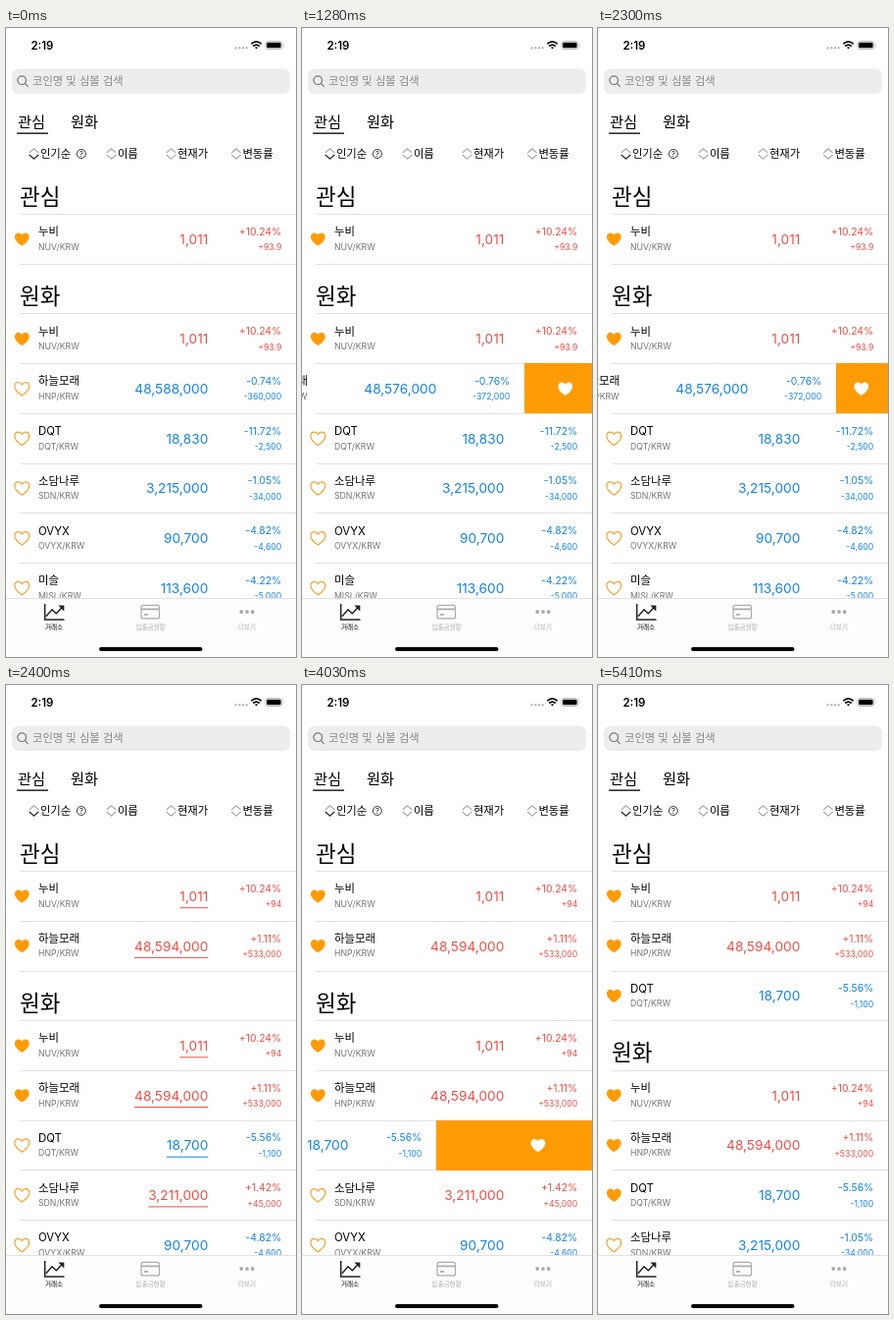
Recreate the animation shown at these times as an HTML page. Size 296 by 640 pixels, loop 5.7 s.

```html
<!DOCTYPE html>
<html lang="ko">
<head>
<meta charset="utf-8">
<title>거래소</title>
<style>
  html, body { margin: 0; width: 100%; height: 100%; overflow: hidden; background: #fff; }
  svg { display: block; width: 100vw; height: 100vh; }
  text { font-family: Inter, 'Noto Sans CJK KR', 'Noto Sans CJK', sans-serif; font-size: 11.4px; fill: #000; }
  .line { stroke: #e2e2e2; stroke-width: 1; }
  .title { font-size: 22.5px; }
  .tab { font-size: 15.3px; }
  .hint { font-size: 11.3px; fill: #8a8a8e; }
  .pair { font-size: 8.7px; fill: #747474; }
  .price { font-size: 13.7px; }
  .rate { font-size: 10.4px; }
  .diff { font-size: 8.7px; }
  .price, .rate, .diff { text-anchor: end; }
  .up { fill: #ee4f47; stroke: #ee4f47; }
  .down { fill: #1583e9; stroke: #1583e9; }
  text.up, text.down { stroke: none; }
  .on { fill: #ff9b05; }
  .off { fill: none; stroke: #f5a32c; stroke-width: 1.2; }
  .menu { font-size: 6.6px; fill: #a8a8a8; text-anchor: middle; }
  .ink { fill: none; stroke: #222; stroke-width: 1.2; }
  .dim { fill: none; stroke: #ababab; stroke-width: 1.2; }
</style>
</head>
<body>
<svg viewBox="0 0 296 640">
  <defs>
    <path id="heart" d="M0 6.8C-3.2 4.7-7.4 1.6-7.4-2.4C-7.4-4.9-5.7-6.6-3.6-6.6C-2-6.6-.7-5.7 0-4.3C.7-5.7 2-6.6 3.6-6.6C5.7-6.6 7.4-4.9 7.4-2.4C7.4 1.6 3.2 4.7 0 6.8Z"/>
    <path id="asc" d="M-4.8-1L0-5.3L4.8-1"/>
    <path id="desc" d="M-4.8 1L0 5.3L4.8 1"/>
  </defs>

  <g id="list"></g>

  <!-- status bar -->
  <text x="25.5" y="22" style="font-weight:600">2:19</text>
  <g fill="#bdbdbd">
    <circle cx="234.5" cy="20.3" r="1.2"/><circle cx="238.2" cy="20.3" r="1.2"/>
    <circle cx="241.9" cy="20.3" r="1.2"/><circle cx="245.6" cy="20.3" r="1.2"/>
  </g>
  <g fill="none" stroke="#000" stroke-width="1.7">
    <path d="M250.3 16.2Q255.5 11.5 260.7 16.2M252.2 18.5Q255.5 15.6 258.8 18.5"/>
    <path d="M254 19.8Q255.5 18.7 257 19.8L255.5 21.4Z" fill="#000" stroke="none"/>
  </g>
  <rect x="264.8" y="13.5" width="17" height="8" rx="2.4" fill="none" stroke="#aaa" stroke-width=".8"/>
  <rect x="266" y="14.7" width="14.6" height="5.6" rx="1.3"/>
  <path d="M283 16.2Q284.4 17.5 283 18.8Z" fill="#aaa"/>

  <!-- search -->
  <rect x="6" y="41.5" width="284" height="25.5" rx="7" fill="#ededee"/>
  <g class="ink" style="stroke:#77777b"><circle cx="16.2" cy="53.2" r="4.3"/><path d="M19.3 56.4L22.6 59.8"/></g>
  <text class="hint" x="27" y="58.2">코인명 및 심볼 검색</text>

  <!-- tabs -->
  <text class="tab" x="12" y="100.8">관심</text>
  <text class="tab" x="66" y="100.8">원화</text>
  <rect x="11" y="106.5" width="32" height="1.3"/>

  <g id="sort"></g>
  <g class="ink" style="stroke-width:.9"><circle cx="76.8" cy="128" r="4.5"/></g>
  <text x="76.8" y="130.7" style="font-size:7.4px;text-anchor:middle">?</text>

  <!-- bottom bar -->
  <rect y="581" width="296" height="59" fill="#fefefe"/>
  <path class="line" d="M0 580.5H296"/>
  <path class="ink" style="stroke-width:1.5" d="M39.7 586V602H59.5M41 598.5L47 591.8L51.3 595.8L57 589.8"/>
  <path d="M53.4 587.6H59.3V593.5Z" fill="#222"/>
  <g class="dim"><rect x="138" y="587.3" width="18.5" height="13.6" rx="2"/><path d="M138 591.3H156.5M141 596.8H145" stroke-width="1.8"/></g>
  <g fill="#ababab"><circle cx="240.3" cy="594" r="1.9"/><circle cx="246" cy="594" r="1.9"/><circle cx="251.7" cy="594" r="1.9"/></g>
  <text class="menu" x="49" y="612.3" style="fill:#000;font-weight:500">거래소</text>
  <text class="menu" x="147.5" y="612.3">입출금현황</text>
  <text class="menu" x="246" y="612.3">더보기</text>
  <rect x="95" y="630" width="105.5" height="4" rx="2"/>
</svg>

<script>
const LOOP = 5700, ROW = 50.7, REST = 55, PRICE_END = 206.3;

// quotes: start time, price, rate, difference
const coins = [
  { name: '누비', code: 'NUV', quotes: [[0, '1,011', '+10.24%', '+93.9'], [2400, '1,011', '+10.24%', '+94']] },
  { name: '하늘모래', code: 'HNP', quotes: [[0, '48,588,000', '-0.74%', '-360,000'],
    [730, '48,576,000', '-0.76%', '-372,000'], [2400, '48,594,000', '+1.11%', '+533,000']] },
  { name: 'DQT', code: 'DQT', quotes: [[0, '18,830', '-11.72%', '-2,500'], [2400, '18,700', '-5.56%', '-1,100']] },
  { name: '소담나루', code: 'SDN', quotes: [[0, '3,215,000', '-1.05%', '-34,000'],
    [2400, '3,211,000', '+1.42%', '+45,000'], [5410, '3,215,000', '-1.05%', '-34,000']] },
  { name: 'OVYX', code: 'OVYX', quotes: [[0, '90,700', '-4.82%', '-4,600']] },
  { name: '미슬', code: 'MISL', quotes: [[0, '113,600', '-4.22%', '-5,000']] }
];

// underline under a fresh price: section, coin, from, to
const flashes = [
  [1, 1, 730, 1020], [1, 0, 2400, 2630], [1, 2, 2400, 2630],
  [0, 0, 2400, 3260], [0, 1, 2400, 3260], [1, 1, 2400, 3260], [1, 3, 2400, 3260]
];

// swiped row: time, coin, revealed width, heart x
const swipes = [
  [0, -1, 0, 0],
  [1170, 1, 30, 268.8], [1280, 1, 69, 268.8], [1400, 1, 74, 268.8],
  [1510, 1, 66, 268.8], [1630, 1, 58, 268.8], [1740, 1, REST, 268.8],
  [1860, 1, 54.6, 268.8], [1970, 1, 54.2, 268.8], [2190, 1, 53.6, 268.8], [2300, 1, 53, 268.8],
  [2400, -1, 0, 0],
  [4030, 2, 159, 241], [4130, 2, 296, 27.5],
  [4430, -1, 0, 0]
];

const list = document.getElementById('list');
const latest = (steps, t) => steps.filter(s => s[0] <= t).pop();
const text = (cls, x, y, s) => `<text class="${cls}" x="${x}" y="${y}">${s}</text>`;
const line = y => `<path class="line" d="M14 ${Math.floor(y) + .5}H296"/>`;
const heart = (cls, x, y) => `<use href="#heart" class="${cls}" x="${x}" y="${y}"/>`;

function row(section, i, y, t, liked) {
  const coin = coins[i];
  const [, price, rate, diff] = latest(coin.quotes, t);
  const tone = rate[0] === '+' ? 'up' : 'down';
  const flash = flashes.some(([s, c, a, b]) => s === section && c === i && t >= a && t < b);
  const [, swiped, width, hx] = latest(swipes, t);
  const open = section === 1 && swiped === i;
  const cell = `<g transform="translate(${open ? -width : 0} ${y})">` +
    heart(liked ? 'on' : 'off', 16.3, 25.3) +
    text('', 33, 21.7, coin.name) +
    text('pair', 33, 36, coin.code + '/KRW') +
    text(`price ${tone}${flash ? ' flash' : ''}`, PRICE_END, 30.2, price) +
    text('rate ' + tone, 281.3, 21.3, rate) +
    text('diff ' + tone, 281.3, 36.7, diff) + '</g>';
  const action = open
    ? `<rect class="on" x="${296 - width}" y="${Math.floor(y)}" width="${width}" height="51"/>` +
      `<g fill="#fff">${heart('', hx, y + 25.3)}</g>`
    : '';
  return line(y + ROW) + cell + action;
}

function section(s, title, top, count, t, liked) {
  let out = text('title', 14, top + 28.5, title) + line(top + 38.5);
  for (let i = 0; i < count; i++) out += row(s, i, top + 38.7 + i * ROW, t, i < liked);
  return out;
}

function draw(t) {
  const liked = t < 2400 ? 1 : t < 4430 ? 2 : 3;
  list.innerHTML = section(0, '관심', 151, liked, t, liked) +
    section(1, '원화', 151 + ROW * (liked + 1), coins.length, t, liked);
  for (const el of list.querySelectorAll('.flash')) {
    const w = el.getComputedTextLength();
    el.insertAdjacentHTML('afterend',
      `<path class="${el.classList[1]}" d="M${PRICE_END - w} 37h${w}"/>`);
  }
}

document.getElementById('sort').innerHTML =
  [[28.5, '인기순'], [107.5, '이름'], [168.5, '현재가'], [235, '변동률']].map(([x, s], i) =>
    `<use href="#asc" class="dim" x="${x}" y="128"/>` +
    `<use href="#desc" class="${i ? 'dim' : 'ink'}" x="${x}" y="128"/>` +
    text('', x + 6.4, 132.2, s)).join('');

// every moment at which the picture changes
const marks = [...new Set([0, 2400, 4430, ...swipes.map(s => s[0]),
  ...flashes.flatMap(f => f.slice(2)), ...coins.flatMap(c => c.quotes.map(q => q[0]))])].sort((a, b) => a - b);
let shown = -1;

function tick() {
  const t = performance.now() % LOOP;
  const mark = marks.filter(m => m <= t).pop();
  if (mark !== shown) draw(shown = mark);
  requestAnimationFrame(tick);
}
tick();
</script>
</body>
</html>
```
